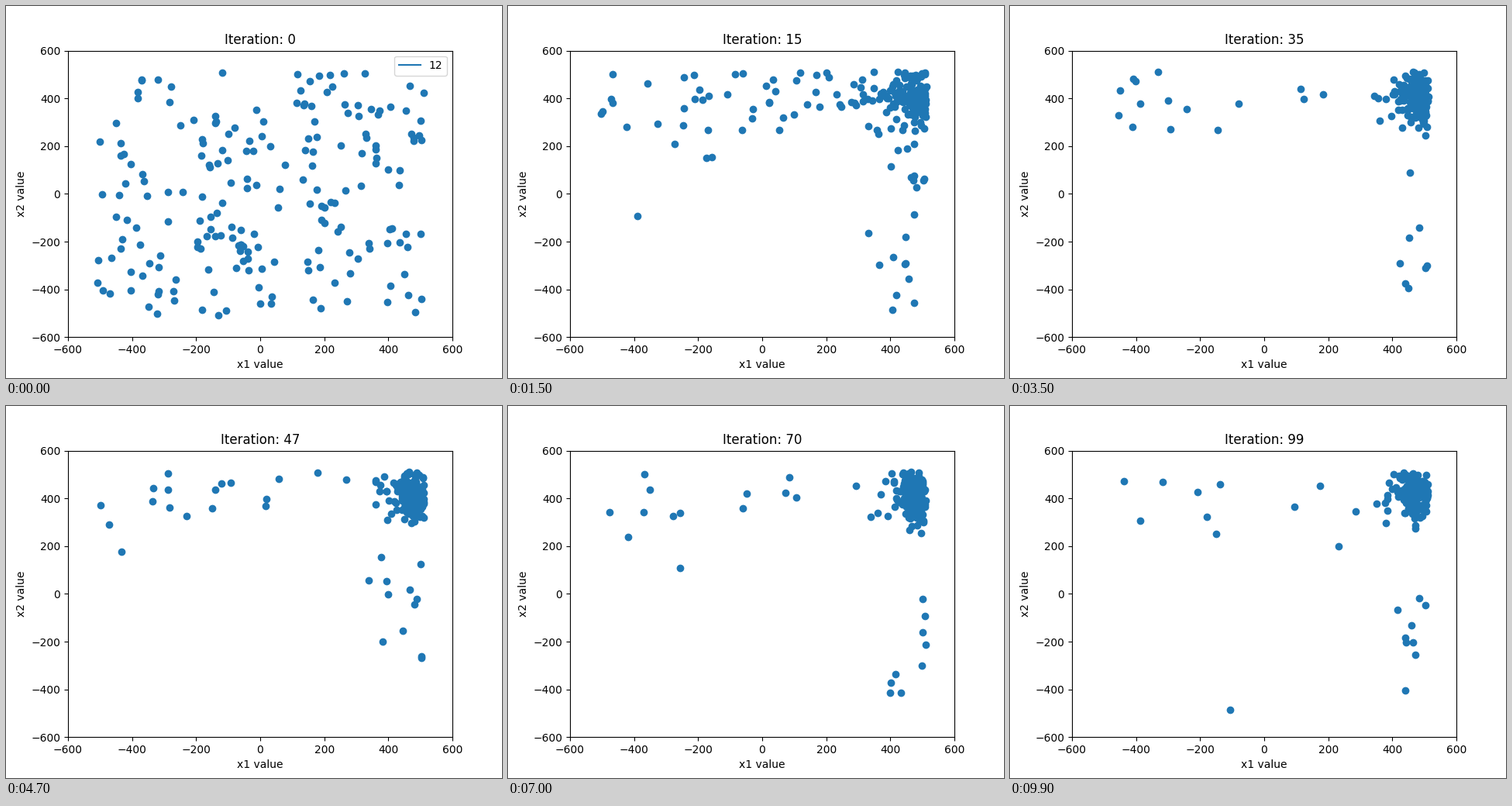
These frames come from a looping animation (640 px wide and 480 px high, 10000 ms). A matplotlib script:

```python
import numpy as np
import matplotlib.pyplot as plt
from matplotlib.animation import FuncAnimation

plt.rcParams["text.kerning_factor"] = 6

POP = 200
BOUND = 512
FRAMES = 100


def population(t):
    """Individuals converging on the upper right corner, plus mutants."""
    rng = np.random.default_rng(7 + t)
    decay = np.exp(-t / 8)

    # Chance that x1 or x2 is still random; everything is random at t = 0
    rates = [0.09 + 0.91 * decay, 0.07 + 0.93 * np.exp(-t / 6)]
    mutant = rng.random((POP, 2)) < rates
    spread = np.where(mutant.any(axis=1), 1.7, 1)

    y = 400 + 0.2 * t + 54 * (1 + 0.6 * decay) * spread * rng.normal(size=POP)
    x = 482 - 0.1 * t - 60 * decay - 0.12 * (y - 410)
    x += 25 * (1 + 7 * decay) * spread * rng.standard_t(5, POP)

    # Reflect overshoot at the upper bound
    pts = BOUND - np.abs(BOUND - np.column_stack([x, y]))
    pts[mutant] = rng.uniform(-BOUND, BOUND, mutant.sum())
    return pts.clip(-BOUND, BOUND)


fig, ax = plt.subplots(figsize=(6.4, 4.8), dpi=100)
ax.set(xlim=(-600, 600), ylim=(-600, 600),
       xlabel="x1 value", ylabel="x2 value")
line, = ax.plot([], [], color="C0")
legend = ax.legend([line], ["12"], loc="upper right")
dots = ax.scatter(*population(0).T, color="C0")
title = ax.set_title("Iteration: 0")


def update(t):
    dots.set_offsets(population(t))
    title.set_text(f"Iteration: {t}")
    legend.set_visible(t == 0)
    return dots, title, legend


anim = FuncAnimation(fig, update, frames=FRAMES, interval=100,
                     repeat=True, repeat_delay=0)
plt.show()
```
